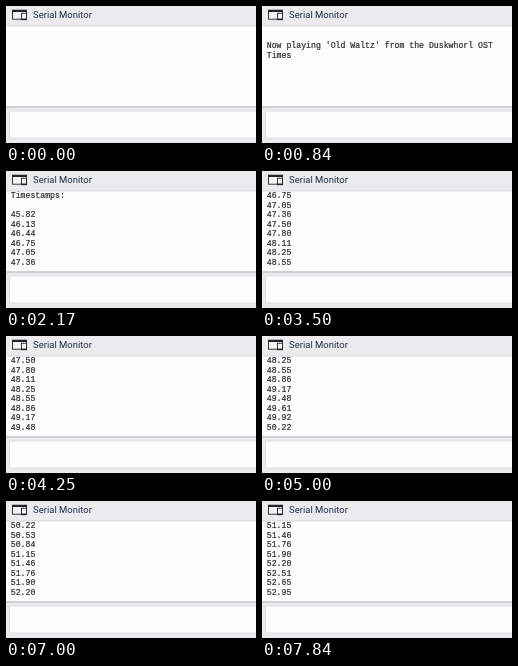
An HTML page that plays this animation: 250x137 px, repeating every 8000 ms.

```html
<!DOCTYPE html>
<html lang="en">
<head>
<meta charset="utf-8">
<title>Serial Monitor</title>
<style>
html, body { margin: 0; width: 100%; height: 100%; overflow: hidden; background: #ebebed; }
svg { display: block; width: 100vw; height: 100vh; }
.log text {
  font: 8.2px "Liberation Mono", monospace;
  fill: #2c2c30; stroke: #2c2c30; stroke-width: .2px;
  white-space: pre;
}
.title { font: 9.5px Roboto, sans-serif; fill: #22304a; }
</style>
</head>
<body>
<svg viewBox="0 0 250 137">
  <rect width="250" height="137" fill="#ebebed"/>
  <rect y="20" width="250" height="80" fill="#fdfdfd"/>
  <g class="log"></g>

  <rect width="250" height="20" fill="#ebebed"/>
  <rect y="19.5" width="250" height="1" fill="#dadade"/>
  <g stroke="#242428" fill="#f4f4f5" stroke-width=".9">
    <rect x="6.5" y="4.2" width="14" height="9"/>
    <path d="M6 5h15" stroke-width="2"/>
    <rect x="15.5" y="7.2" width="5" height="6.5"/>
    <path d="M15.5 13.2h5" stroke-width="1.4"/>
  </g>
  <text class="title" x="27" y="12.4">Serial Monitor</text>

  <rect y="100" width="250" height="2" fill="#cfcfd6"/>
  <rect y="108" width="2" height="18" fill="#e4eeec"/>
  <rect x="3.5" y="105" width="250" height="27" fill="#fdfdfd" stroke="#dfdfe3"/>
</svg>
<script>
const LOOP = 8000, CHAR_MS = 7, PITCH = 9.55, FIRST_Y = 42.4, LAST_Y = 93.8;

// The log prints the clock, in seconds, at each long (L) or short (S) note
const NOTES = "LLLLLSLLSLLLLSLLLLLLLSLLSL", LONG = .3077, SHORT = .1336;
const toMs = clock => 1490 + (clock - 46.752) * 985;

const lines = [];
let freeAt = 488; // when the printer has finished the line before
function print(text, due = 0) {
  const start = Math.max(due, freeAt);
  lines.push({ text, start });
  freeAt = start + text.length * CHAR_MS;
}

print("Now playing 'Old Waltz' from the Duskwhorl OST");
print("Timestamps:");
print("");
let clock = 45.829;
for (const note of NOTES + "L") {
  print((Math.floor(clock * 100) / 100).toFixed(2), toMs(clock));
  clock += note === "L" ? LONG : SHORT;
}

const log = document.querySelector(".log");
for (const line of lines) {
  line.row = log.appendChild(document.createElementNS("http://www.w3.org/2000/svg", "text"));
  line.row.setAttribute("x", 4.8);
}

function draw(t) {
  const last = lines.filter(line => line.start <= t).length - 1;
  const scroll = Math.max(0, FIRST_Y + last * PITCH - LAST_Y);
  lines.forEach(({ text, start, row }, i) => {
    const y = FIRST_Y + i * PITCH - scroll;
    const count = Math.max(0, Math.floor((t - start) / CHAR_MS) + 1);
    row.textContent = y > 20 ? text.slice(0, count) : "";
    row.setAttribute("y", y);
  });
}

const origin = performance.now();
function tick() {
  draw((performance.now() - origin) % LOOP);
  requestAnimationFrame(tick);
}
tick();
</script>
</body>
</html>
```
